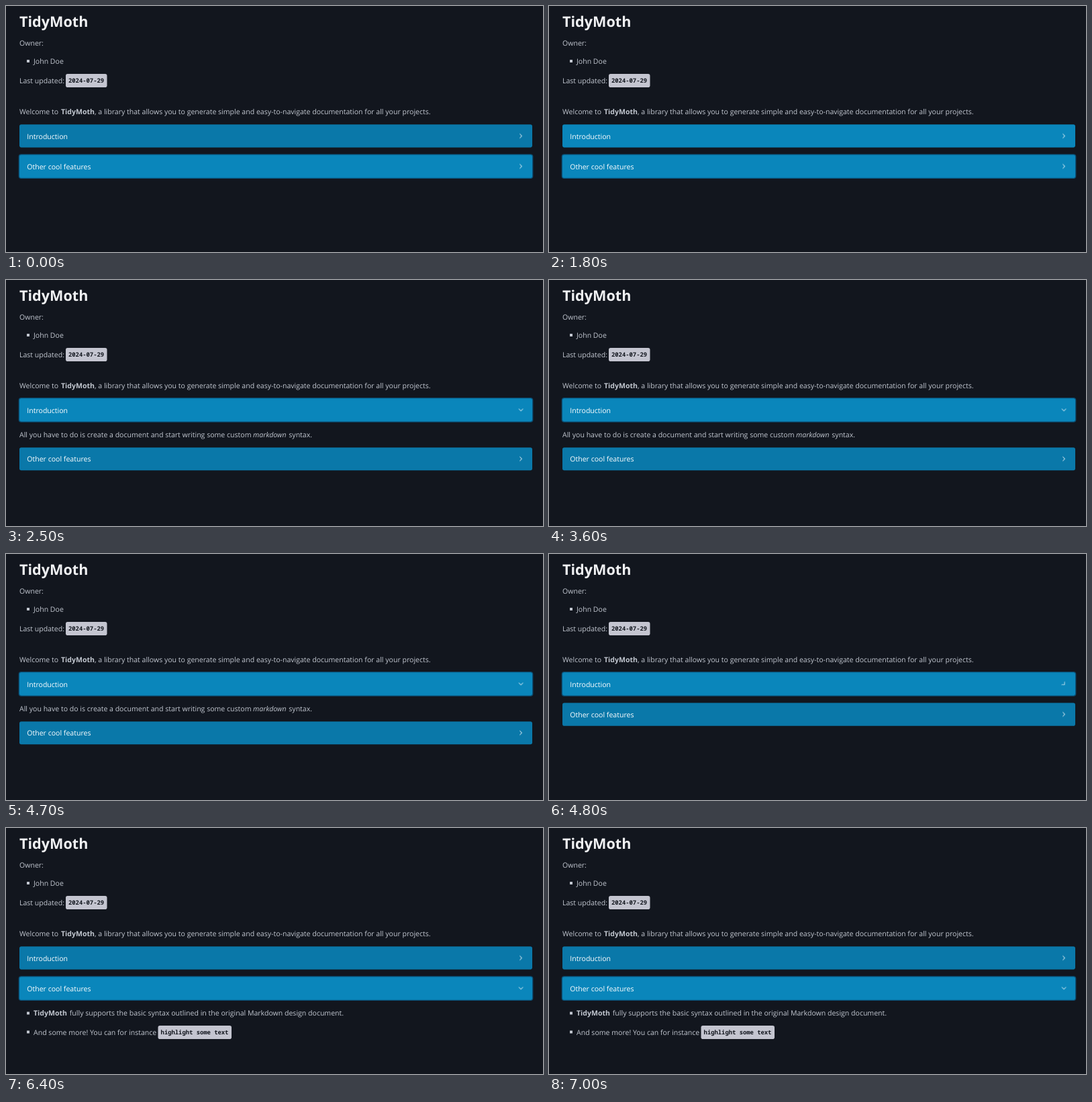
Write an HTML page that moves like this. It is 800 px wide and 366 px high and loops after 8000 ms.

```html
<!DOCTYPE html>
<html lang="en">
<head>
<meta charset="utf-8">
<title>Documentation page</title>
<style>
  :root {
    --page: #12161e;
    --text: #c2c7d0;
    --button: #0a78a9;
    --blend: #0a7fb2;
    --hover: #0a86bb;
  }
  html, body { margin: 0; width: 100%; height: 100%; overflow: hidden; background: var(--page); }
  svg { display: block; width: 100%; height: 100%; }
  text {
    font: 10.56px "Open Sans", "Noto Sans", sans-serif;
    fill: var(--text);
    text-rendering: geometricPrecision;
    white-space: pre;
  }
  .title { font-size: 21.6px; font-weight: 700; fill: #f0f1f3; }
  .bold { font-weight: 700; }
  .italic { font-style: italic; }
  .label { fill: #fff; }
  .code { font: 700 8.85px "Noto Sans Mono", "DejaVu Sans Mono", monospace; fill: #12161e; }
  .chip { fill: #c4c5d0; }
  .bullet { fill: var(--text); }
  .ring { fill: #01aaff; fill-opacity: .375; }
  .chevron { fill: none; stroke: #fff; stroke-width: 1; stroke-linecap: round; stroke-linejoin: round; transform: rotate(-90deg); }

  /* Everything shares an 8 s clock; 1.25% is one 100 ms tick. */
  .anim { animation: 8s step-end infinite; }
  .intro .fill { animation-name: intro-fill; }
  .intro .ring { animation-name: intro-ring; }
  .intro .chevron { animation-name: intro-chevron; }
  .intro-body { animation-name: intro-body; }
  .other { animation-name: other-shift; }
  .other .fill { animation-name: other-fill; }
  .other .ring { animation-name: other-ring; }
  .other .chevron { animation-name: other-chevron; }
  .other-body { animation-name: other-body; }

  @keyframes intro-fill {
    0% { fill: var(--button); }
    12.5% { fill: var(--blend); }
    13.75%, 72.5% { fill: var(--hover); }
    73.75% { fill: var(--blend); }
    75%, 100% { fill: var(--button); }
  }
  @keyframes other-fill {
    0% { fill: var(--hover); }
    23.75% { fill: var(--blend); }
    25% { fill: var(--button); }
    71.25% { fill: var(--blend); }
    72.5%, 100% { fill: var(--hover); }
  }
  @keyframes intro-ring {
    0% { opacity: 0; }
    23.75% { opacity: .5; }
    25% { opacity: 1; }
    73.75% { opacity: .5; }
    75%, 100% { opacity: 0; }
  }
  @keyframes other-ring {
    0% { opacity: 1; }
    23.75% { opacity: .5; }
    25% { opacity: 0; }
    73.75% { opacity: .5; }
    75%, 100% { opacity: 1; }
  }
  @keyframes intro-chevron {
    0% { transform: rotate(-90deg); }
    23.75% { transform: rotate(-45deg); }
    25% { transform: rotate(0deg); }
    60% { transform: rotate(-45deg); }
    61.25%, 100% { transform: rotate(-90deg); }
  }
  @keyframes other-chevron {
    0% { transform: rotate(-90deg); }
    73.75% { transform: rotate(-45deg); }
    75%, 100% { transform: rotate(0deg); }
  }
  @keyframes intro-body {
    0% { visibility: hidden; }
    23.75% { visibility: visible; }
    60%, 100% { visibility: hidden; }
  }
  @keyframes other-body {
    0% { visibility: hidden; }
    73.75%, 100% { visibility: visible; }
  }
  @keyframes other-shift {
    0% { transform: translateY(0); }
    23.75% { transform: translateY(27.6px); }
    60%, 100% { transform: translateY(0); }
  }
</style>
</head>
<body>
<svg viewBox="0 0 800 366">
  <text class="title" x="20" y="31">TidyMoth</text>
  <text x="20" y="58.5">Owner:</text>
  <rect class="bullet" x="31" y="80" width="4" height="4"/>
  <text x="41" y="86">John Doe</text>
  <text x="20" y="114.5">Last updated:</text>
  <rect class="chip" x="89" y="101" width="61.5" height="20" rx="2.8"/>
  <text class="code" x="93" y="114.3">2024-07-29</text>
  <text x="20" y="161">Welcome to <tspan class="bold" x="82">TidyMoth</tspan><tspan x="132">, a library that allows you to generate simple and easy-to-navigate documentation for all your projects.</tspan></text>

  <g class="intro">
    <rect class="ring anim" x="18.6" y="174.9" width="766.8" height="36.9" rx="4"/>
    <rect class="fill anim" x="20" y="176.3" width="764" height="34.1" rx="2.8"/>
    <text class="label" x="31.3" y="197.5">Introduction</text>
    <g transform="translate(767.1 193.4)"><path class="chevron anim" d="M-2.8-1.4L0 1.4L2.8-1.4"/></g>
  </g>
  <text class="intro-body anim" x="20" y="234.2">All you have to do is create a document and start writing some custom <tspan class="italic" x="368">markdown</tspan><tspan x="421.3">syntax.</tspan></text>

  <g class="other anim">
    <rect class="ring anim" x="18.6" y="220.2" width="766.8" height="36.9" rx="4"/>
    <rect class="fill anim" x="20" y="221.6" width="764" height="34.1" rx="2.8"/>
    <text class="label" x="31.3" y="242.7">Other cool features</text>
    <g transform="translate(767.1 238.5)"><path class="chevron anim" d="M-2.8-1.4L0 1.4L2.8-1.4"/></g>
  </g>
  <g class="other-body anim">
    <rect class="bullet" x="31" y="273.5" width="4" height="4"/>
    <text x="41" y="279.3"><tspan class="bold">TidyMoth</tspan><tspan x="94.8">fully supports the basic syntax outlined in the original Markdown design document.</tspan></text>
    <rect class="bullet" x="31" y="301.5" width="4" height="4"/>
    <text x="41" y="307.5">And some more! You can for instance</text>
    <rect class="chip" x="226.5" y="294" width="109.5" height="20" rx="2.8"/>
    <text class="code" x="230.6" y="307.3">highlight some text</text>
  </g>
</svg>
</body>
</html>
```
